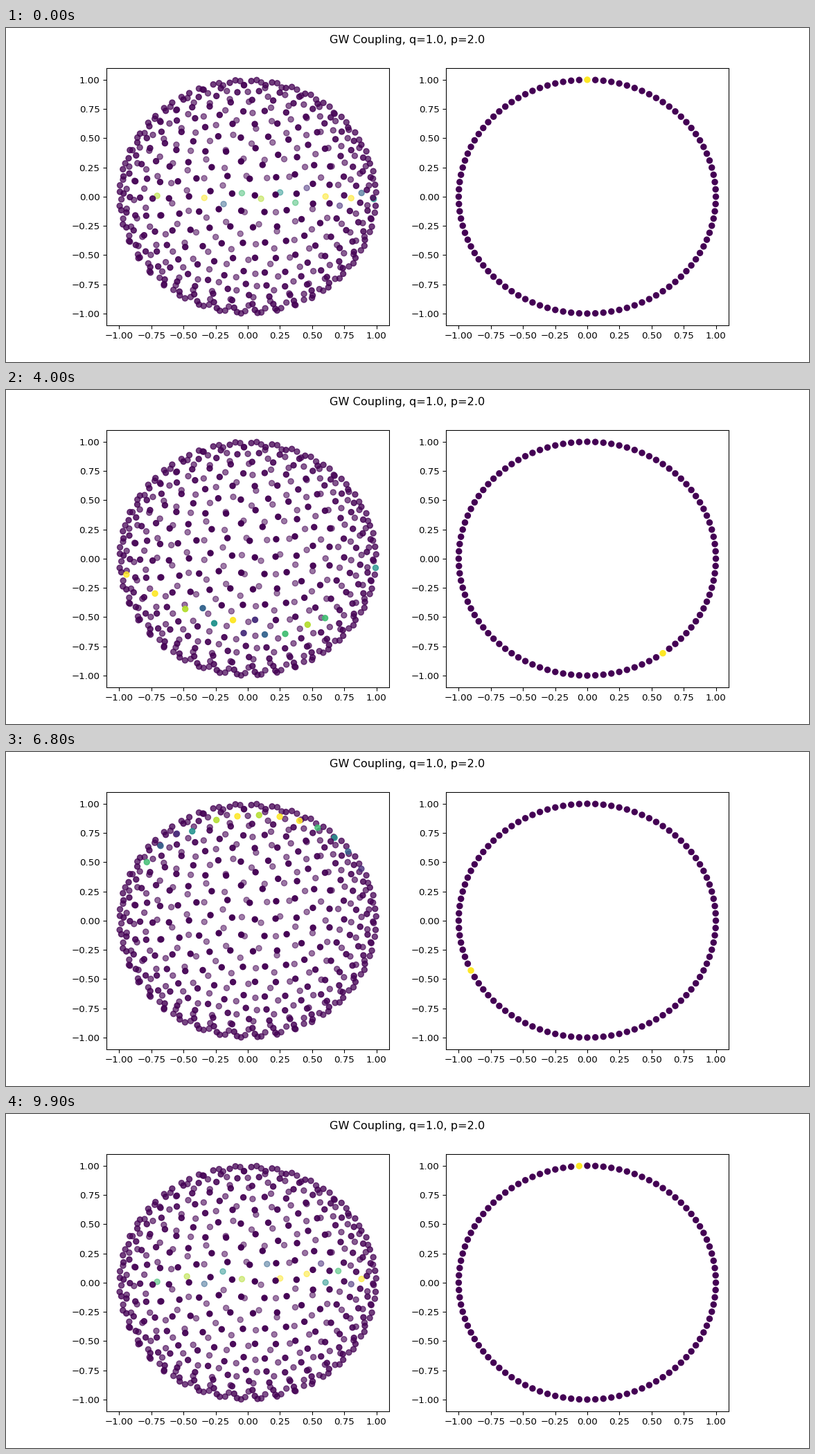
Recreate the animation shown at these times as a matplotlib script. Size 1159 by 483 pixels, loop 10 s.

```python
import numpy as np
import matplotlib.pyplot as plt
from matplotlib.animation import FuncAnimation

WIDTH, HEIGHT, DPI = 1159, 483, 96.6
STEPS = 100        # points on the circle, one per frame
N = 500            # points on the sphere
REACH = 4.8        # half width of a coupled meridian, degrees
CORE = 1.0         # half width of its fully coupled middle


def unit(p):
    return p / np.linalg.norm(p, axis=1, keepdims=True) if False else \
        p / np.sqrt((p ** 2).sum(1, keepdims=True))


def even_sphere(n, rounds=300):
    """Scatter points at random, then let them push each other apart."""
    rng = np.random.default_rng(7)
    p = unit(rng.normal(size=(n, 3)))
    for _ in range(rounds):
        d2 = np.maximum(2 - 2 * p @ p.T, 1e-4)
        np.fill_diagonal(d2, np.inf)
        w = d2 ** -2
        move = 2e-5 * (p * w.sum(1, keepdims=True) - w @ p)
        size = np.sqrt((move ** 2).sum(1, keepdims=True))
        p = unit(p + move * np.minimum(1, 0.02 / np.maximum(size, 1e-12)))
    return p[np.argsort(p[:, 2])]


def matched_angle(p):
    """Circle angle of each point: its longitude about a tilted x axis,
    ranked so that every circle point gets an equal share."""
    x, y, z = p.T
    lon = np.arctan2(-y * np.exp(-0.5 * x), -z) % (2 * np.pi)
    return np.argsort(np.argsort(lon)) * 360 / len(p)


sphere = even_sphere(N)
angle = matched_angle(sphere)
depth_alpha = 0.75 + 0.25 * sphere[:, 2]
turn = 2 * np.pi * np.arange(STEPS) / STEPS
viridis = plt.get_cmap("viridis")


def sphere_colors(step):
    gap = np.abs((angle - step * 360 / STEPS + 180) % 360 - 180)
    rgba = viridis(np.clip((REACH - gap) / (REACH - CORE), 0, 1))
    rgba[:, 3] = depth_alpha
    return rgba


def circle_colors(step):
    return viridis((np.arange(STEPS) == step).astype(float))


# The tiny surplus keeps the pixel size from rounding down
fig, axes = plt.subplots(
    1, 2, dpi=DPI, figsize=((WIDTH + 1e-3) / DPI, (HEIGHT + 1e-3) / DPI))
fig.suptitle("GW Coupling, q=1.0, p=2.0")
ticks = np.linspace(-1, 1, 9)
for ax in axes:
    ax.set(xlim=(-1.1, 1.1), ylim=(-1.1, 1.1), xticks=ticks, yticks=ticks)
ball = axes[0].scatter(sphere[:, 0], sphere[:, 1], c=sphere_colors(0))
ring = axes[1].scatter(np.sin(turn), np.cos(turn), c=circle_colors(0))


def draw(step):
    ball.set_color(sphere_colors(step))
    ring.set_color(circle_colors(step))
    return ball, ring


anim = FuncAnimation(fig, draw, frames=STEPS, interval=100,
                     repeat=True, repeat_delay=0)
plt.show()
```
